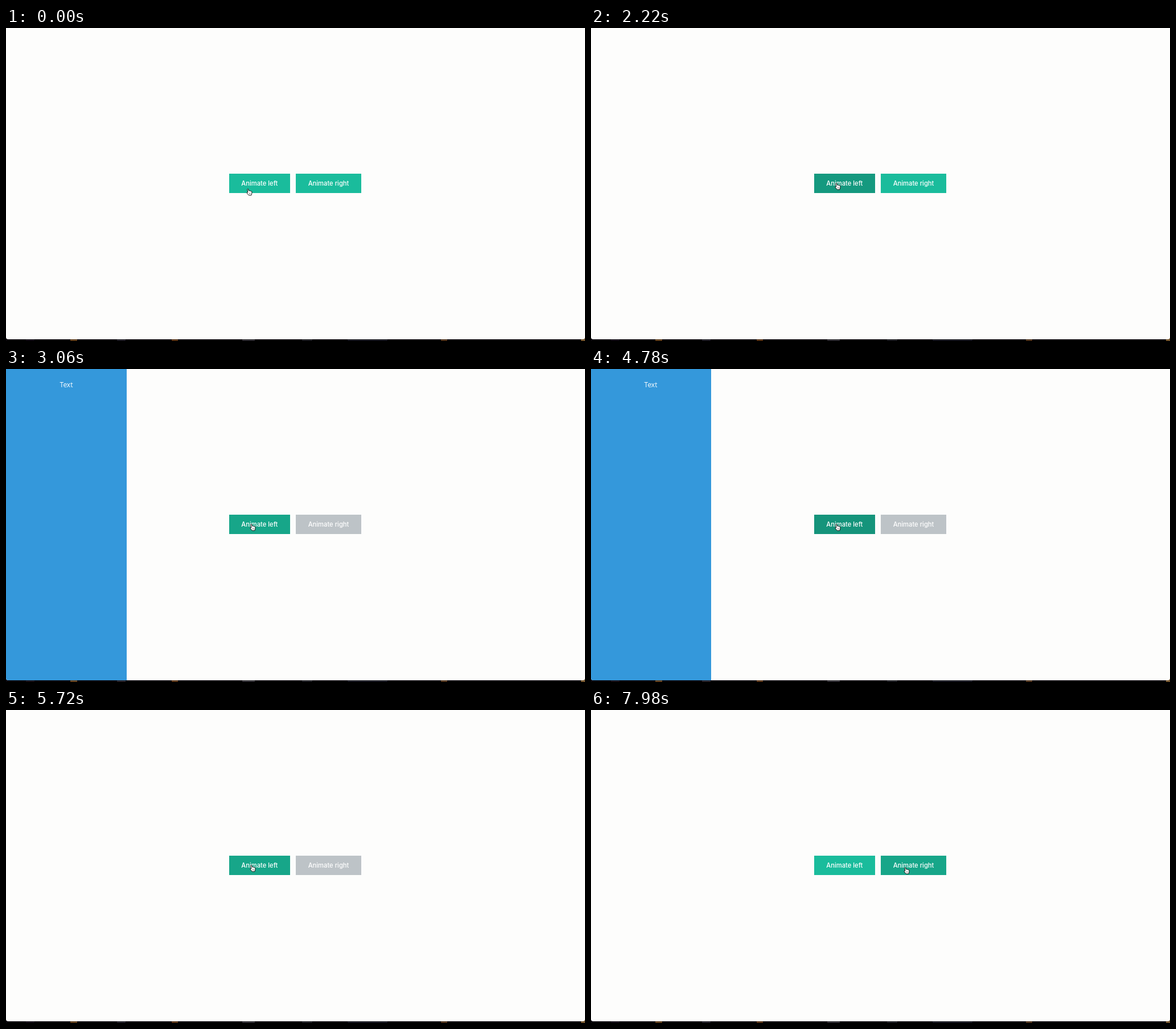
Recreate the animation shown at these times as an HTML page. Size 1017 by 550 pixels, loop 8 s.

```html
<!DOCTYPE html>
<html lang="en">
<head>
<meta charset="utf-8">
<title>Sliding panel</title>
<style>
  html, body { margin: 0; width: 100%; height: 100%; overflow: hidden; }
  body {
    position: relative;
    background:
      linear-gradient(90deg, transparent 35px, #17121a 35px 50px, transparent 50px 113px,
        #60401f 113px 125px, transparent 125px 195px, #24222a 195px 210px, transparent 210px 291px,
        #583519 291px 302px, transparent 302px 415px, #302e33 415px 437px, transparent 437px 520px,
        #202024 520px 538px, transparent 538px 600px, #1b1b23 600px 670px, transparent 670px 764px,
        #50351f 764px 775px, transparent 775px 1010px, #75572f 1010px) #09050b;
  }
  #page {
    position: absolute; left: 0; top: 0; width: 1017px; height: 547px;
    overflow: hidden; background: #fdfdfc; border-radius: 0 0 4px 4px;
  }
  #page div {
    position: absolute; color: #fff; text-align: center; white-space: nowrap;
  }
  #panel {
    left: 0; top: 0; width: 212px; height: 547px; background: #3498db;
    font: 12px/56px "Open Sans", sans-serif;
  }
  .button { top: 256px; height: 34px; font: 500 11.2px/34px Inter, sans-serif; }
  #left { left: 392px; width: 106.5px; }
  #right { left: 509px; width: 115px; }
  #hand { position: absolute; left: 0; top: 0; }
</style>
</head>
<body>
<div id="page">
  <div id="panel">Text</div>
  <div id="left" class="button">Animate left</div>
  <div id="right" class="button">Animate right</div>
  <svg id="hand" width="12" height="14" fill="#fff" stroke="#111" stroke-linejoin="round">
    <path d="M2.8 7.6L1.9 2Q2.4.6 3.5 1.4L4.5 4.6Q5.6 3.9 6.4 4.9Q7.5 4.3 8.2 5.3Q9.7 5 10 6.4L9.8 9L8.9 12.4H4.4L.8 8.2Q1 6.6 2.8 7.6Z"/>
    <path d="M5.4 8.2v2M7.2 8.2v2" stroke-width=".6"/>
  </svg>
</div>
<script>
const LOOP = 8000;
const GREEN = [26, 188, 156], HOVER = [23, 166, 137];
const ACTIVE = [20, 143, 119], GREY = [189, 195, 199];
const OPEN = 48.5, CLOSE = 102.83, SLIDE = 15, FADE = 9;

// Colour transitions as [start step, target]
const leftFades = [[0, HOVER], [44, ACTIVE], [OPEN, HOVER], [98.5, ACTIVE], [CLOSE, HOVER], [139.8, GREEN]];
const rightFades = [[OPEN, GREY], [138.5, GREEN], [141, HOVER]];
// Pointer positions as [step, x, y]
const path = [[0, 427, 288], [12, 433, 278], [136, 433, 278], [143, 548, 284], [151, 554, 282]];

const el = id => document.getElementById(id);
const panel = el("panel"), left = el("left"), right = el("right"), hand = el("hand");
const clamp = x => Math.min(1, Math.max(0, x));
const mix = (a, b, p) => a + (b - a) * p;
const smooth = x => x * x * (3 - 2 * x);

// CSS "ease": cubic-bezier(.25, .1, .25, 1)
function ease(x) {
  x = clamp(x);
  if (x === 0 || x === 1) return x;
  const curve = (s, a, b) => 3 * (1 - s) ** 2 * s * a + 3 * (1 - s) * s * s * b + s ** 3;
  let lo = 0, hi = 1;
  for (let i = 0; i < 24; i++) {
    const mid = (lo + hi) / 2;
    if (curve(mid, .25, .25) < x) lo = mid; else hi = mid;
  }
  return curve(lo, .1, 1);
}

function stepAt(ms) {
  const rest = ms % 140;
  return 3 * Math.floor(ms / 140) + (rest < 20 ? 0 : rest < 120 ? 1 : 2);
}

function colour(fades, step) {
  const rgb = fades.reduce((from, [start, to]) => {
    const p = ease((step - start) / FADE);
    return from.map((c, i) => mix(c, to[i], p));
  }, GREEN);
  return `rgb(${rgb.map(Math.round)})`;
}

function pointer(step) {
  let [, x, y] = path[0];
  for (let i = 1; i < path.length; i++) {
    const start = path[i - 1][0], [end, toX, toY] = path[i];
    const p = smooth(clamp((step - start) / (end - start)));
    x = mix(x, toX, p);
    y = mix(y, toY, p);
  }
  return [x, y];
}

function draw(now) {
  const step = stepAt(now % LOOP);
  const shown = ease((step - OPEN) / SLIDE) - ease((step - CLOSE) / SLIDE);
  const [x, y] = pointer(step);
  panel.style.transform = `translateX(${Math.round(212 * (shown - 1))}px)`;
  left.style.background = colour(leftFades, step);
  right.style.background = colour(rightFades, step);
  hand.style.transform = `translate(${x - 5}px, ${y - 6.5}px)`;
}

let begin;
function tick(now) {
  begin ??= now;
  draw(now - begin);
  requestAnimationFrame(tick);
}
draw(0);
requestAnimationFrame(tick);
</script>
</body>
</html>
```
